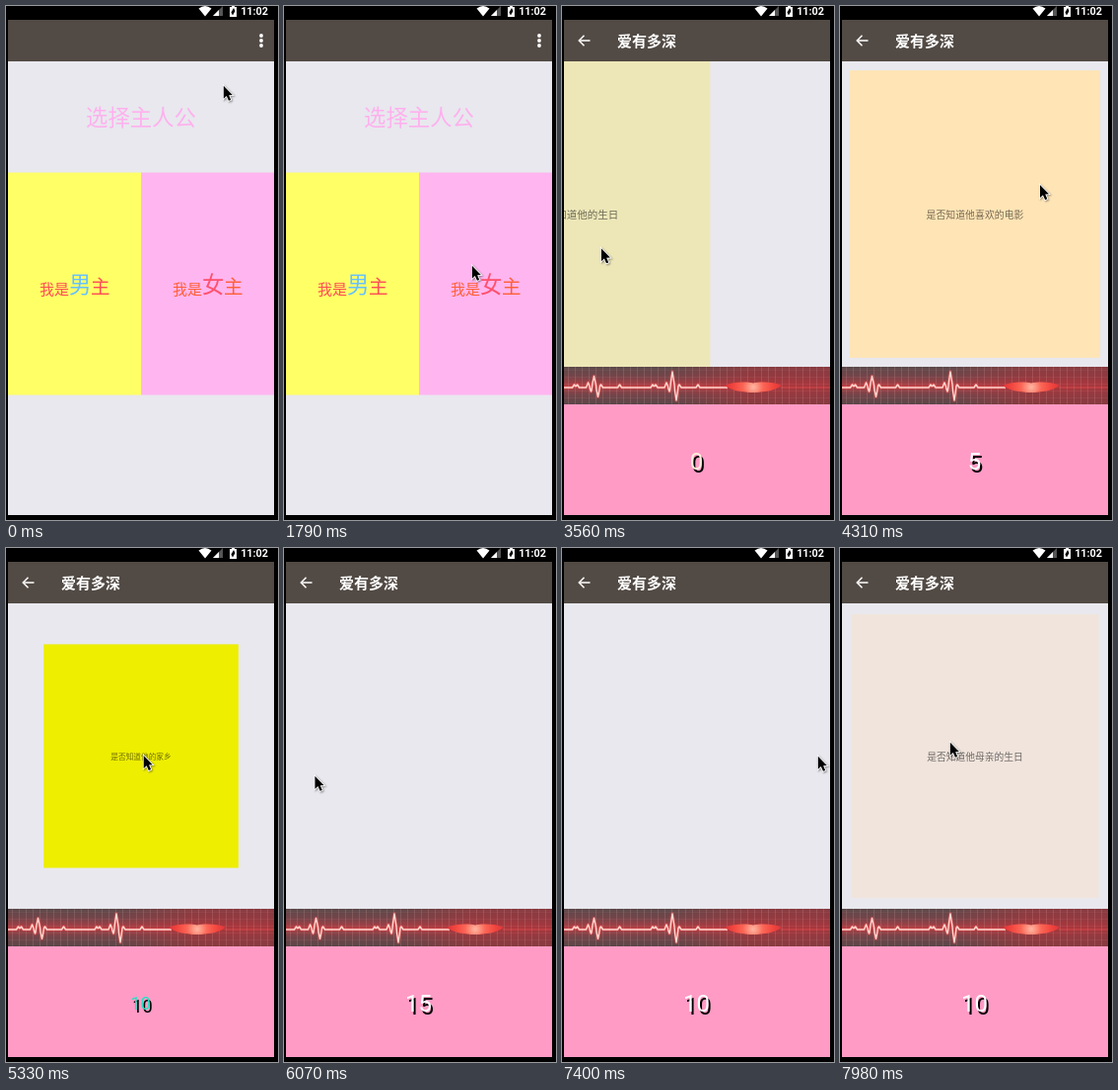
An HTML page with a canvas for the animation above (8000 ms loop, 276 px wide and 520 px high).

```html
<!DOCTYPE html>
<html lang="zh-CN">
<head>
<meta charset="utf-8">
<title>爱有多深</title>
<style>
html, body { margin: 0; width: 100%; height: 100%; overflow: hidden; background: #000; }
canvas { display: block; width: 276px; height: 520px; }
</style>
</head>
<body>
<canvas id="stage" width="276" height="520"></canvas>
<script>
const ctx = document.getElementById('stage').getContext('2d');
const LOOP = 8000, OPEN = 2390, STEP = 147.5, GROW = 565;
const CJK = '"Noto Sans CJK SC", "Noto Sans CJK", sans-serif';
const PAPER = '#e8e8ee', ROSE = '#ff9bc5', BAR = '#524a44';

// The screen refreshes in bursts of even steps and rests in between.
const bursts = [750, 2390, 3560, 4750, 5190, 6370, 7690];

// A card grows from `pop`, is dragged off from `out` and is gone by `end`.
const cards = [
  { text: '是否知道他的生日', fill: '#ede7b8', pop: 2262, out: 2980, end: 3860, points: 5 },
  { text: '是否知道他喜欢的电影', fill: '#ffe4b5', pop: 3870, out: 4450, end: 4900, points: 5 },
  { text: '是否知道他的家乡', fill: '#eeee00', pop: 5065, out: 5630, end: 6070, points: 5 },
  { text: '是否知道他父亲的生日', fill: '#ffe1ff', pop: 6100, out: 6815, end: 7390, points: -5 },
  { text: '是否知道他母亲的生日', fill: '#f0e4dc', pop: 7570, out: LOOP, end: LOOP + GROW, points: 5 }
];

// Where the pointer turns: time, x, y.
const turns = [
  [600, 220, 80], [1040, 253, 46], [1780, 190, 262], [2980, 190, 262],
  [3710, 0, 240], [4300, 203, 180], [4450, 203, 180], [4900, 70, 190],
  [5330, 140, 209], [6070, 30, 230], [6660, 102, 228], [6815, 102, 228],
  [7390, 259, 210], [7690, 259, 210], [7980, 111, 196]
];

const clamp = v => Math.max(0, Math.min(1, v));
const grow = (card, t) => 1 - (1 - clamp((t - card.pop) / GROW)) ** 2;
const gone = (card, t) => clamp((t - card.out) / (card.end - card.out)) ** 2;

function refreshTime(time) {
  const from = bursts.findLast(b => b <= time);
  if (from === undefined) return 0;
  const last = from === 4750 ? 1 : 7;
  return from + STEP * Math.min(last, Math.floor((time - from) / STEP + 0.1));
}

function box(x, y, w, h, fill) {
  ctx.fillStyle = fill;
  ctx.fillRect(x, y, w, h);
}

function label(text, x, y, size, fill, align = 'left', family = CJK, weight = 400) {
  ctx.font = `${weight} ${size}px ${family}`;
  ctx.textAlign = align;
  ctx.fillStyle = fill;
  ctx.fillText(text, x, y);
}

function trace(points, close) {
  ctx.beginPath();
  points.forEach(([x, y]) => ctx.lineTo(x, y));
  if (close) ctx.closePath();
}

function shape(points, fill) {
  trace(points, true);
  ctx.fillStyle = fill;
  ctx.fill();
}

function stroke(color, width) {
  ctx.strokeStyle = color;
  ctx.lineWidth = width;
  ctx.stroke();
}

function gradient(x0, y0, x1, y1, ...colors) {
  const g = ctx.createLinearGradient(x0, y0, x1, y1);
  colors.forEach((c, i) => g.addColorStop(i / (colors.length - 1), c));
  return g;
}

function statusBar() {
  box(0, 0, 276, 14, '#000');
  ctx.beginPath();
  ctx.moveTo(202, 10.5);
  ctx.lineTo(195.5, 2.5);
  ctx.quadraticCurveTo(202, -2.5, 208.5, 2.5);
  ctx.fillStyle = '#fff';
  ctx.fill();
  shape([[220, 0], [220, 10], [210, 10]], '#555');
  shape([[216, 4], [216, 10], [210, 10]], '#fff');
  box(227, 1, 7, 10, '#fff');
  box(229, 0, 3, 1, '#fff');
  shape([[231, 2], [228.5, 6.5], [230, 9.5], [232.5, 5]], '#000');
  label('11:02', 266, 9.3, 10.8, '#fff', 'right', 'Roboto, sans-serif', 600);
}

function chooser() {
  box(2, 14, 270, 42, BAR);
  for (const y of [30, 35, 40]) {
    ctx.beginPath();
    ctx.arc(259, y, 1.9, 0, 7);
    ctx.fillStyle = '#fff';
    ctx.fill();
  }
  box(2, 56, 270, 459, PAPER);
  label('选择主人公', 137, 121, 22.4, '#ffb0ee', 'center');
  option(2, '男', '#ffff66', '#ff4d55', '#66c0ff');
  option(137, '女', '#ffb5f0', '#ff6038', '#ff506c');
}

function option(x, word, back, fill, accent) {
  box(x, 168.5, 135, 225, back);
  label('我是', x + 32, 291.5, 15, fill);
  label(word, x + 62, 290, 22.4, accent);
  label('主', x + 84, 290.5, 19.5, fill);
}

// Heartbeat height: a sharp double spike with small bumps around it.
function pulse(x) {
  const bump = (at, height, width) => height * Math.max(0, 1 - Math.abs(x - at) / width);
  const beat = (at, size) => bump(at, 16 * size, 2.5) - bump(at + 4, 13 * size, 2)
    - bump(at - 3, 4, 1.5) + bump(at - 6, 5, 2) + bump(at + 7, 3, 2)
    + bump(at - 17, 3, 2) + bump(at - 20, 3, 2) + bump(at + 26, 3, 2);
  return beat(32.5, 0.72) + beat(112, 1);
}

function pulseStrip() {
  box(2, 365, 270, 38, gradient(0, 365, 0, 403, '#5c494a', '#73454a', '#ab3d43', '#73454a', '#5a4648'));
  box(110, 365, 162, 38, gradient(110, 0, 272, 0, 'rgba(180,48,54,0)', 'rgba(180,48,54,.5)', 'rgba(165,50,58,.6)'));
  for (let x = 6; x < 272; x += 7) box(x, 365, 1, 38, 'rgba(225,170,170,.18)');
  for (let y = 368; y < 403; y += 7) box(2, y, 270, 1, 'rgba(225,170,170,.08)');

  const line = [];
  for (let x = 2; x <= 168; x += 0.5) line.push([x, 386 - pulse(x)]);
  trace(line);
  ctx.lineJoin = 'round';
  stroke('rgba(255,80,80,.4)', 3.5);
  stroke('#ffd8d0', 1.4);
  box(222, 385.5, 50, 1, 'rgba(255,90,85,.5)');

  const glow = ctx.createRadialGradient(194, 385.5, 1, 194, 385.5, 29);
  ['#ffb09c', '#fb6656', '#f3473f', '#dc3439'].forEach((c, i) => glow.addColorStop(i / 3, c));
  ctx.beginPath();
  ctx.moveTo(165, 384);
  ctx.bezierCurveTo(174, 380, 187, 380, 194, 381.5);
  ctx.bezierCurveTo(201, 380, 215, 380, 223, 384);
  ctx.bezierCurveTo(216, 389, 204, 391, 194, 391);
  ctx.bezierCurveTo(184, 391, 172, 389, 165, 384);
  ctx.fillStyle = glow;
  ctx.fill();
}

function drawCard(card, t) {
  const s = grow(card, t), p = gone(card, t);
  if (!s || p > 0.99) return;
  ctx.save();
  ctx.beginPath();
  ctx.rect(2, 56, 270, 309);
  ctx.clip();
  ctx.translate(137 - Math.sign(card.points) * 280 * p, 210.5);
  ctx.scale(s, s);
  box(-135, -154.5, 270, 309, card.fill);
  label(card.text, 0, 4.6, 10.5, 'rgba(0,0,0,.54)', 'center');
  ctx.restore();
}

function score(t) {
  const total = cards.reduce((sum, c) => sum + (gone(c, t) > 0.96 ? c.points : 0), 0);
  const popping = t >= bursts[4] && grow(cards[2], t) < 0.9;
  const s = popping ? 0.76 : 1;
  const put = (dx, dy, fill) =>
    label(total, 137 + dx, 461 + 8 * s + dy, 24 * s, fill, 'center', 'Roboto, sans-serif');
  put(1.5, 2.5, '#000');
  put(-0.5, 0, popping ? '#25e2c4' : total ? '#fff' : '#ffefdc');
}

function quiz(t) {
  const shown = clamp((t - 2300) / 240);
  const late = clamp((t - OPEN) / 480);
  ctx.save();
  ctx.beginPath();
  ctx.rect(2, 14, 270, 501);
  ctx.clip();
  ctx.globalAlpha = shown;
  ctx.translate(0, 28 * (1 - shown) ** 2);
  box(2, 14, 270, 42, BAR);
  box(2, 56, 270, 309, PAPER);
  box(2, 403, 270, 112, ROSE);
  label('爱有多深', 56, 40.5, 15, '#fff', 'left', CJK, 700);
  cards.forEach(card => drawCard(card, t));
  score(t);
  pulseStrip();
  box(2, 365, 270, 38, `rgba(232,210,216,${1 - late})`);
  ctx.globalAlpha = shown * late;
  ctx.lineJoin = 'miter';
  trace([[22.5, 29.8], [17.3, 35], [22.5, 40.2]]);
  stroke('#fff', 1.5);
  trace([[18, 35], [28.5, 35]]);
  stroke('#fff', 1.5);
  ctx.restore();
}

function drawPointer(t) {
  const next = turns.findIndex(([at]) => at > t);
  const b = turns.at(next), a = next > 0 ? turns[next - 1] : b;
  const p = a === b ? 0 : (t - a[0]) / (b[0] - a[0]);
  ctx.save();
  ctx.translate(a[1] + (b[1] - a[1]) * p + 0.8, a[2] + (b[2] - a[2]) * p + 0.8);
  ctx.scale(0.86, 0.86);
  trace([[0, 0], [0, 15], [3.5, 11.8], [6, 17.5], [8.6, 16.4], [6.2, 11], [10.5, 10.8]], true);
  ctx.shadowColor = 'rgba(0,0,0,.4)';
  ctx.shadowBlur = 2;
  ctx.shadowOffsetX = ctx.shadowOffsetY = 1;
  stroke('#fff', 2);
  ctx.shadowColor = 'transparent';
  ctx.fillStyle = '#000';
  ctx.fill();
  ctx.restore();
}

function draw(now) {
  const t = refreshTime(now % LOOP);
  box(0, 0, 276, 520, '#000');
  if (t < OPEN + STEP) chooser();
  if (t >= OPEN) quiz(t);
  statusBar();
  drawPointer(t);
}

const start = performance.now();
function loop() {
  draw(performance.now() - start);
  requestAnimationFrame(loop);
}
loop();
</script>
</body>
</html>
```
